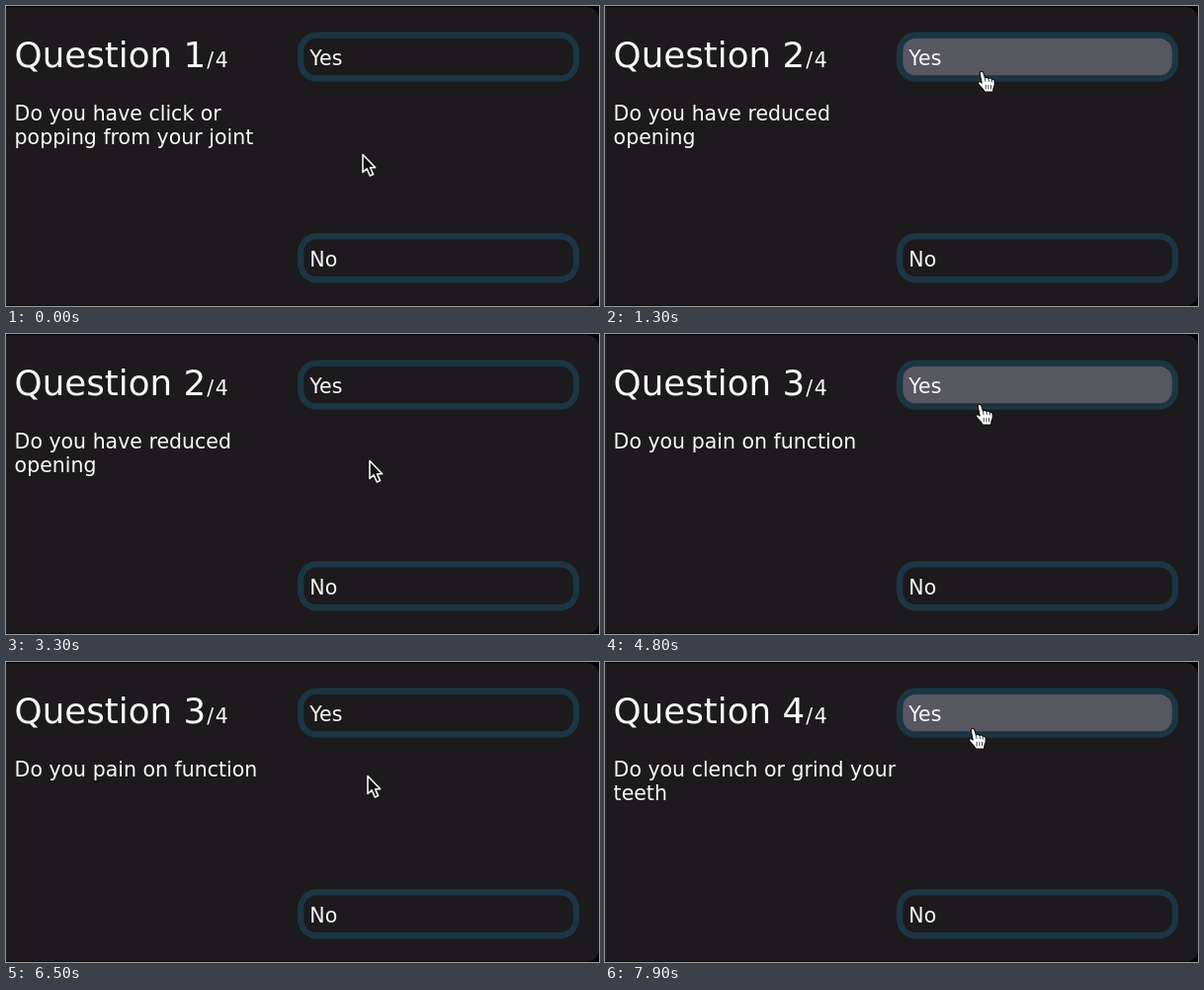
Write an HTML page with a canvas that moves like this. It is 600 px wide and 304 px high and loops after 8 s.

```html
<!DOCTYPE html>
<html lang="en">
<head>
<meta charset="utf-8">
<title>Joint questionnaire</title>
<style>
  html, body { margin: 0; width: 100%; height: 100%; overflow: hidden; background: #000; }
  canvas { display: block; }
</style>
</head>
<body>
<canvas id="stage" width="600" height="304"></canvas>
<script>
const ctx = document.getElementById('stage').getContext('2d');
const LOOP = 8000, STEP = 100;
const BG = '#1c1a1d', BORDER = '#1b3642', HOVER = '#575760', INK = '#f8f8f6';

const questions = [
  { from: 0, lines: ['Do you have click or', 'popping from your joint'] },
  { from: 1200, lines: ['Do you have reduced', 'opening'] },
  { from: 4400, lines: ['Do you pain on function'] },
  { from: 7500, lines: ['Do you clench or grind your', 'teeth'] }
];

// Pointer hot spot: time, x, y
const path = [
  [0, 360, 149], [700, 380, 73], [900, 382, 66], [1700, 382, 66],
  [1800, 379, 71], [2000, 371, 90], [2500, 360, 153], [3000, 360, 153],
  [3300, 367, 127], [3900, 380, 69], [4000, 381, 67], [4700, 381, 67],
  [4800, 380, 71], [5600, 360, 149], [5800, 360, 154], [6000, 360, 154],
  [6500, 365, 114], [6900, 370, 89], [7200, 373, 67], [LOOP, 373, 67]
];
const hovers = [[700, 1800], [3800, 4800], [7000, LOOP]];
const FADE = 150;

const clamp = v => Math.max(0, Math.min(1, v));

function pointerAt(t) {
  const i = path.findIndex(p => p[0] > t);
  const [t0, x0, y0] = path[i - 1], [t1, x1, y1] = path[i];
  const k = (t - t0) / (t1 - t0);
  return { x: x0 + (x1 - x0) * k, y: y0 + (y1 - y0) * k };
}

function hoverAt(t) {
  return Math.max(...hovers.map(([on, off]) =>
    Math.min(clamp((t - on) / FADE), 1 - clamp((t - off) / FADE))));
}

function text(str, x, y, size = 20.5) {
  ctx.font = `${size}px "DejaVu Sans", Verdana, sans-serif`;
  ctx.fillStyle = INK;
  ctx.fillText(str, x, y);
}

function box(x, y, w, h, r, color) {
  ctx.fillStyle = color;
  ctx.beginPath();
  ctx.roundRect(x, y, w, h, r);
  ctx.fill();
}

function button(y, label, hover) {
  box(295, y, 285, 50.5, 20, BORDER);
  box(301.3, y + 6.5, 272.5, 37.5, 13, BG);
  ctx.globalAlpha = hover;
  box(301.3, y + 6.5, 272.5, 37.5, 13, HOVER);
  ctx.globalAlpha = 1;
  text(label, 307.3, y + 33.6);
}

function shape(d, fill, stroke, width) {
  const p = new Path2D(d);
  ctx.lineWidth = width;
  ctx.lineJoin = ctx.lineCap = 'round';
  ctx.strokeStyle = stroke;
  if (fill) {
    ctx.fillStyle = fill;
    ctx.fill(p);
  }
  ctx.stroke(p);
}

function arrow() {
  shape('M1 1.5V19.5L5.1 15.8L8.3 23L11.6 21.6L8.5 14.7H13.7Z', '#111012', '#f4f4f4', 1.6);
}

function hand() {
  shape('M-2.8 2.2Q-2.8 .3 -1 .3Q.5 .3 1 2L2.4 6.8Q4.5 5.6 6 7.4' +
        'Q8 6.3 9.3 8.3Q11.8 7.8 12.2 10.5Q12.8 15 10.8 18V21H2.2' +
        'Q.5 17.8 -2.2 15.3Q-5.2 12.7 -4.2 11.3Q-2.8 10 -.8 12Z',
        '#fff', '#0b0a0b', 1.1);
  shape('M2.4 7L3 10.5M6 7.7L6.4 10.5M9.3 8.6L9.6 11M3.2 14.2V18M5.9 14.2V18M8.5 14.2V18',
        null, '#333', .9);
}

function draw(t) {
  ctx.fillStyle = '#000';
  ctx.fillRect(0, 0, 600, 304);
  box(-20, 1, 620, 302.5, 12, BG);

  const n = questions.filter(q => q.from <= t).length;
  text('Question ' + n, 8.6, 62.3, 35.7);
  text('/', 203.3, 62.3);
  text('4', 211.7, 62.3);
  questions[n - 1].lines.forEach((line, i) => text(line, 8.6, 115.5 + i * 24.8));

  button(26.3, 'Yes', hoverAt(t));
  button(230, 'No', 0);

  const { x, y } = pointerAt(t);
  ctx.save();
  ctx.translate(x, y);
  (y < 77 ? hand : arrow)();
  ctx.restore();
}

function tick() {
  const t = performance.now() % LOOP;
  draw(Math.floor(t / STEP) * STEP);
  requestAnimationFrame(tick);
}
tick();
</script>
</body>
</html>
```
